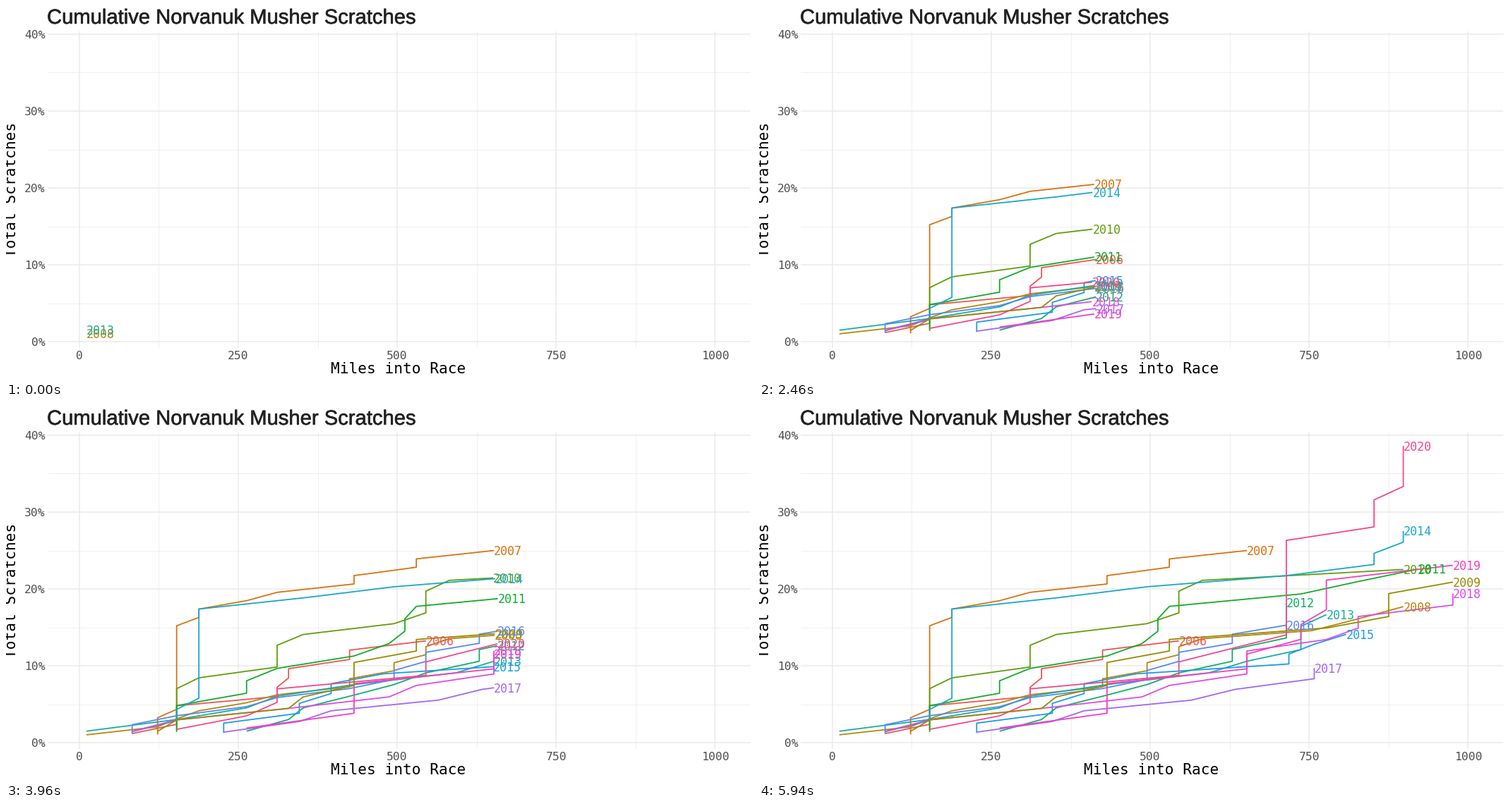
A matplotlib script for the animation above (6 s loop, 1058 by 529 pixels).

```python
import numpy as np
import matplotlib.pyplot as plt
import matplotlib.patheffects as pe
from matplotlib.animation import FuncAnimation

W, H, DPI = 1058, 529, 64
FRAMES, INTERVAL = 100, 60
FIRST, LAST = 11, 976
MONO = "DejaVu Sans Mono"

# year: (starters, {mile: scratches so far}), one group per trail
NORTH = {
    2006: (83, {83: 1, 153: 4, 311: 6, 329: 8, 425: 10, 545: 11}),
    2008: (96, {11: 1, 123: 2, 153: 3, 188: 4, 263: 5, 311: 6, 425: 8, 495: 10,
                545: 12, 582: 13, 754: 14, 804: 15, 852: 16, 898: 17}),
    2010: (71, {153: 5, 188: 6, 311: 9, 352: 10, 495: 11, 545: 14, 582: 15, 898: 16}),
    2012: (66, {263: 1, 329: 2, 352: 3, 425: 4, 495: 5, 545: 6, 629: 8, 714: 12}),
    2014: (69, {83: 1, 153: 3, 188: 12, 352: 13, 495: 14, 714: 15, 852: 17, 898: 19}),
    2016: (85, {83: 2, 153: 3, 263: 4, 311: 5, 425: 6, 495: 8, 545: 10, 629: 12, 714: 13}),
    2020: (57, {153: 1, 263: 2, 311: 4, 545: 6, 629: 7, 714: 15, 852: 18, 898: 22}),
}
SOUTH = {
    2007: (92, {123: 3, 153: 14, 188: 16, 263: 17, 311: 18, 432: 20, 530: 22, 652: 23}),
    2009: (67, {123: 1, 153: 2, 329: 3, 352: 4, 432: 7, 530: 9, 777: 10, 875: 13, 976: 14}),
    2011: (62, {153: 3, 263: 5, 311: 6, 432: 7, 487: 8, 512: 10, 530: 11,
                737: 12, 827: 13, 921: 14}),
    2013: (66, {11: 1, 153: 2, 263: 3, 311: 4, 432: 5, 592: 6, 652: 7, 737: 10, 777: 11}),
    2018: (67, {83: 1, 153: 2, 329: 3, 487: 4, 530: 5, 652: 8, 777: 9, 827: 11, 976: 13}),
    2019: (52, {263: 1, 432: 4, 652: 6, 737: 8, 777: 11, 976: 12}),
}
INLAND = {
    2015: (78, {227: 2, 346: 4, 396: 6, 478: 7, 718: 9, 758: 10, 808: 11}),
    2017: (72, {227: 1, 346: 2, 396: 3, 565: 4, 633: 5, 758: 7}),
}
RACES = {**NORTH, **SOUTH, **INLAND}
COLORS = ["#f0544f", "#d9720f", "#b8860b", "#958c00", "#5f9e0b", "#12ab2b", "#14ad68",
          "#18ada0", "#17a8c9", "#1b9be8", "#5489f5", "#a366f5", "#dd4be6", "#f140c0",
          "#f4478c"]


def px(mile):
    return 103.9 + 0.9005 * mile


def py(percent):
    return 476.3 - 10.91 * percent


def size(pixels):
    return pixels * 72 / DPI


def build(starters, totals):
    """Points of one race and the frame at which each is reached."""
    pts, prev = [], 0
    for mile, total in totals.items():
        for count in sorted({prev + 1, total}):
            pts.append((mile, 100 * count / starters))
        prev = total
    pts = np.array(pts)
    keys = np.rint((FRAMES - 1) * (pts[:, 0] - FIRST) / (LAST - FIRST))
    return keys, np.column_stack([px(pts[:, 0]), py(pts[:, 1])])


def reveal(keys, pts, frame):
    n = int(np.sum(keys <= frame))
    if n == 0 or n == len(pts):
        return pts[:n]
    t = (frame - keys[n - 1]) / (keys[n] - keys[n - 1])
    return np.vstack([pts[:n], pts[n - 1] + t * (pts[n] - pts[n - 1])])


fig = plt.figure(figsize=(W / DPI, H / DPI), dpi=DPI, facecolor="white")
ax = fig.add_axes([0, 0, 1, 1])
ax.set(xlim=(0, W), ylim=(H, 0))
ax.axis("off")


def write(x, y, s, pixels, **kw):
    kw = {"family": MONO, "va": "baseline", **kw}
    return ax.text(x, y, s, fontsize=size(pixels), **kw)


def grid(xs, ys, width):
    style = dict(color="#ebebeb", lw=size(width), zorder=1)
    ax.vlines(xs, 36, 485, **style)
    ax.hlines(ys, 59, 1054, **style)


grid(px(np.arange(125, 1000, 250)), py(np.arange(5, 40, 10)), 0.75)
grid(px(np.arange(0, 1001, 250)), py(np.arange(0, 41, 10)), 1.5)
for mile in range(0, 1001, 250):
    write(px(mile), 501, str(mile), 16.4, ha="center", color="#4d4d4d")
for pct in range(0, 41, 10):
    write(55.5, py(pct) + 6, f"{pct}%", 16.4, ha="right", color="#4d4d4d")
write(556, 521, "Miles into Race", 21.1, ha="center", color="black")
write(18.5, 260, "Total Scratches", 21.1, ha="right", va="center",
      rotation=90, rotation_mode="default", color="black")
write(58, 25, "Cumulative Norvanuk Musher Scratches", 29.2, family="Liberation Sans",
      color="#222222", path_effects=[pe.withStroke(linewidth=size(0.6), foreground="#222222")])

tracks = []
for year, color in zip(sorted(RACES), COLORS):
    line, = ax.plot([], [], color=color, lw=size(1.8), zorder=3 if year == 2009 else 2,
                    solid_capstyle="butt", solid_joinstyle="round")
    label = write(0, 0, str(year), 16.6, color=color, zorder=4)
    tracks.append((*build(*RACES[year]), line, label))


def update(frame):
    for keys, pts, line, label in tracks:
        path = reveal(keys, pts, frame)
        line.set_data(path[:, 0], path[:, 1])
        label.set_visible(len(path) > 0)
        if len(path):
            label.set_position((path[-1, 0], path[-1, 1] + 6.4))
    return [artist for track in tracks for artist in track[2:]]


anim = FuncAnimation(fig, update, frames=FRAMES, interval=INTERVAL, repeat=True,
                     repeat_delay=0, blit=False)
plt.show()
```
